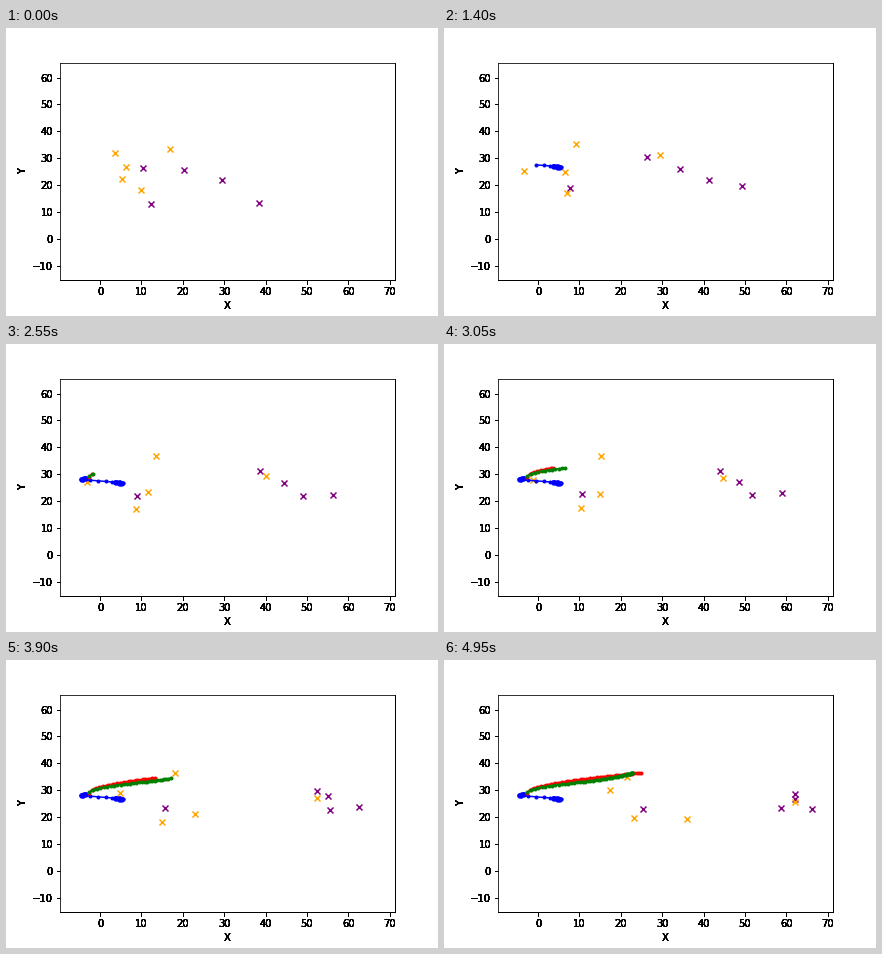
Animation of 432x288 px, one loop 5 s. Source, as a matplotlib script:

```python
import matplotlib.pyplot as plt
import numpy as np
from matplotlib.animation import FuncAnimation

W, H, DPI = 432, 288, 72
FRAMES, STEP = 100, 50
LAST = (FRAMES - 1) * STEP
BOX = (0.125, 0.125, 0.775, 0.755)
OVERDRAW = 8  # repeated axes give the heavy, dark labels

# The ball is held until PASS, caught at CATCH and thrown at RELEASE (ms)
START, PASS, CATCH, RELEASE = 50, 1250, 1550, 2500

# Each player runs at constant acceleration: start, end, bow of the path
ORANGE = np.array([
    [(3.5, 32.0), (21.6, 34.9), (0.7, 3.2)],
    [(6.2, 26.9), (36.1, 19.2), (-10.1, 0.4)],
    [(5.2, 22.5), (17.3, 30.3), (-14.7, 0.7)],
    [(10.0, 18.4), (23.3, 19.9), (-8.2, -2.0)],
    [(16.8, 33.6), (62.0, 25.5), (0, 0)],
])
PURPLE = np.array([
    [(10.3, 26.6), (62.2, 26.9), (1.7, 4.6)],
    [(12.2, 13.2), (25.3, 22.9), (-10.1, 3.7)],
    [(20.4, 25.5), (62.0, 28.8), (2.7, -0.5)],
    [(29.4, 21.8), (58.6, 23.6), (4.6, -0.6)],
    [(38.5, 13.6), (66.1, 22.9), (3.6, 4.1)],
])


def positions(team, t):
    u = t / LAST
    start, end, bow = team.transpose(1, 0, 2)
    return start + (end - start) * u + 4 * u * (1 - u) * bow


def held_ball(t):
    """Ball wobbling in one player's hands, passed left, wobbling again."""
    a = 3 * np.pi * np.clip((t - START) / (PASS - START), 0, 1)
    b = 3 * np.pi * np.clip((t - CATCH) / (RELEASE - CATCH), 0, 1)
    u = np.clip((t - PASS) / (CATCH - PASS), 0, 1)
    k = u * u * (3 - 2 * u)
    x = (1 - k) * (4.5 - 0.95 * -np.cos(a)) + k * (-4 - 0.6 * np.cos(b))
    y = ((1 - k) * (26.9 - 0.2 * np.cos(a) + 0.3 * np.sin(a))
         + k * (28.3 - 0.2 * np.cos(b) + 0.2 * np.sin(b)))
    return np.column_stack([x, y])


def arc(q, start, end, lift):
    return np.column_stack([start[0] + (end[0] - start[0]) * q,
                            start[1] + (end[1] - start[1]) * lift])


def make_axes():
    ax = fig.add_axes(BOX, facecolor="none")
    ax.set(xlim=(-9.67, 71.23), ylim=(-15.15, 65.55), xlabel="X", ylabel="Y",
           xticks=range(0, 71, 10), yticks=range(-10, 61, 10))
    return ax


fig = plt.figure(figsize=(W / DPI, H / DPI), dpi=DPI, facecolor="white")
for _ in range(OVERDRAW):
    make_axes().spines[["left", "top"]].set_visible(False)
ax = make_axes()

hold_times = np.arange(START, RELEASE + 1, STEP)
fly_times = np.arange(RELEASE, LAST + 1, STEP)
s = (fly_times - RELEASE) / (LAST - RELEASE)
eased = 1 - (1 - s) ** 1.75
paths = [
    ("blue", hold_times, held_ball(hold_times)),
    ("red", fly_times, arc(s, (-2.6, 29.1), (25.0, 36.5), s ** 0.53)),
    ("green", fly_times, arc(eased, (-2.6, 29.3), (22.8, 36.4),
                             0.72 * np.sqrt(eased) + 0.28 * eased ** 4)),
]
trails = [(ax.plot([], [], ".-", color=color)[0], times, points)
          for color, times, points in paths]
teams = [(ax.scatter([], [], marker="x", color=color), team)
         for color, team in (("purple", PURPLE), ("orange", ORANGE))]


def draw(frame):
    t = frame * STEP
    for marks, team in teams:
        marks.set_offsets(positions(team, t))
    for line, times, points in trails:
        line.set_data(*points[times <= t].T)
    return [marks for marks, _ in teams] + [line for line, _, _ in trails]


anim = FuncAnimation(fig, draw, frames=FRAMES, interval=STEP,
                     repeat=True, repeat_delay=0)
plt.show()
```
